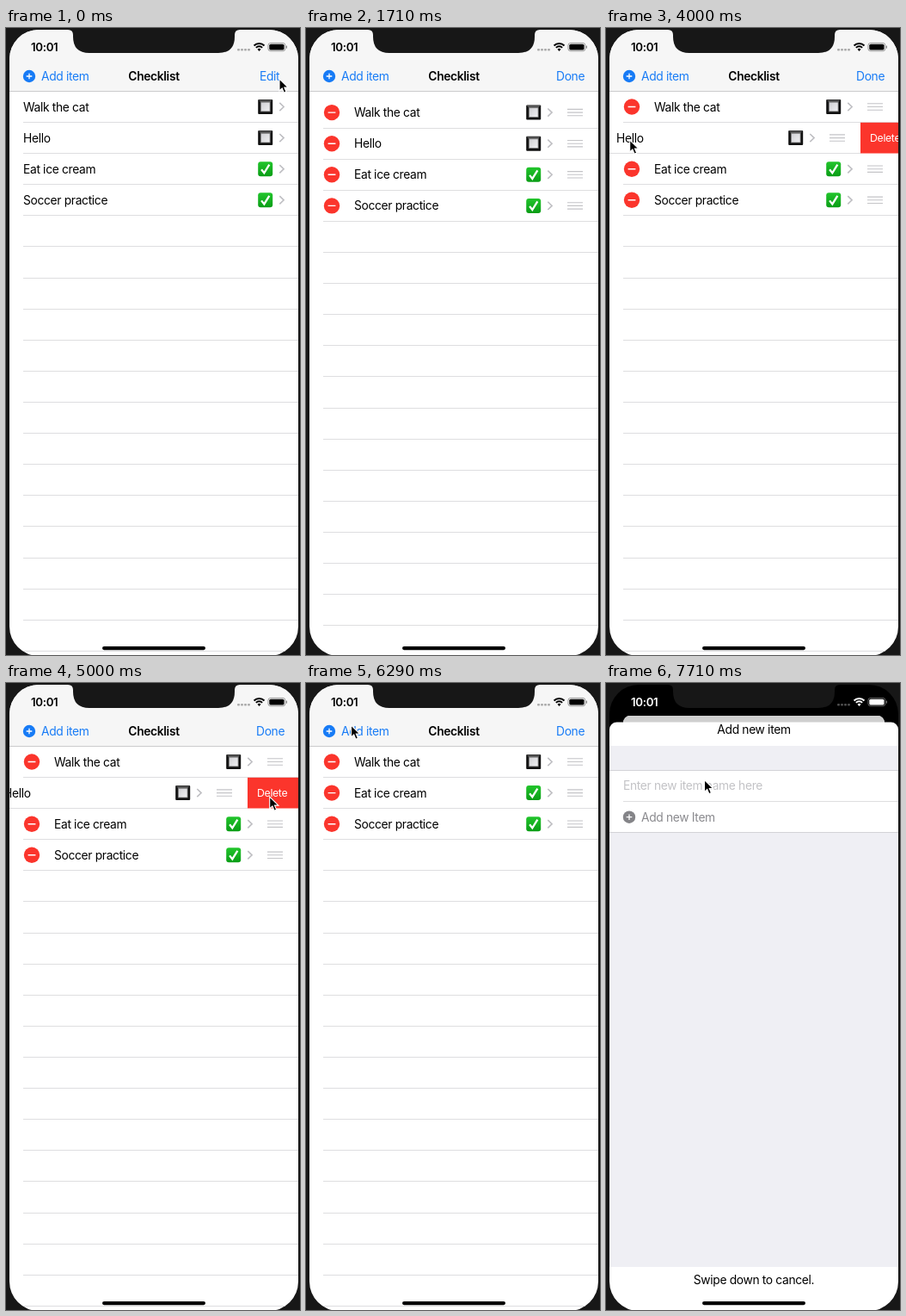
Animation, 342 px wide and 728 px high, one loop 8 s. Source, as an HTML page:

```html
<!DOCTYPE html>
<html lang="en">
<head>
<meta charset="utf-8">
<title>Checklist</title>
<style>
  html, body { margin: 0; width: 100%; height: 100%; overflow: hidden; background: #171717; }
  #stage { display: block; width: 342px; height: 728px; }
  text { font: 13.8px Inter, sans-serif; letter-spacing: -.33px; white-space: pre; }
  .bold { font-weight: 600; }
  .mid { text-anchor: middle; }
</style>
</head>
<body>
<svg id="stage" viewBox="0 0 342 728">
  <defs>
    <clipPath id="screen"><rect x="4" y="2" width="336" height="727" rx="34"/></clipPath>
    <linearGradient id="green" x2="0" y2="1">
      <stop stop-color="#22c52c"/><stop offset="1" stop-color="#0a9d16"/>
    </linearGradient>
    <linearGradient id="pale" x2="1" y2="1">
      <stop stop-color="#cfcfd3"/><stop offset="1" stop-color="#f1f1f3"/>
    </linearGradient>
    <g id="box">
      <rect x="-8.5" y="-8.5" width="17" height="17" rx="1" fill="#111"/>
      <path d="M-8-8H8L5-5H-5Z" fill="#555"/>
      <rect x="-5.4" y="-5.4" width="10.8" height="10.8" fill="url(#pale)" stroke="#777" stroke-width=".8"/>
    </g>
    <g id="tick">
      <rect x="-8.5" y="-8.5" width="17" height="17" rx="3" fill="url(#green)"/>
      <path d="M-4.6 .6L-1.4 4.6L4.6-5" fill="none" stroke="#fff" stroke-width="2.3"/>
    </g>
    <g id="plus">
      <circle r="7.2"/>
      <path d="M-3.3 0H3.3M0-3.3V3.3" stroke="#fff" stroke-width="1.3"/>
    </g>
  </defs>
  <g id="scene"></g>
</svg>
<script>
const LOOP = 8000, FPS = 7, LAST = 54;
const TOP = 73.5, ROW = 36.1, BLUE = '#177bf6', RED = '#fb352c';
const items = [['Walk the cat', 'box'], ['Hello', 'box'], ['Eat ice cream', 'tick'], ['Soccer practice', 'tick']];

// Piecewise linear value from [time, value] pairs
function track(t, keys) {
  let i = 0;
  while (i < keys.length - 1 && t >= keys[i + 1][0]) i++;
  const [t0, a] = keys[i], [t1, b] = keys[i + 1] || [t0 + 1, a];
  return a + (b - a) * Math.max(0, (t - t0) / (t1 - t0));
}
const progress = (t, from, to) => Math.min(1, Math.max(0, (t - from) / (to - from)));
const smooth = p => p * p * (3 - 2 * p);
const easeOut = p => 1 - (1 - p) ** 3;

const rect = (x, y, w, h, fill, more = '') =>
  `<rect x="${x}" y="${y}" width="${w}" height="${h}" fill="${fill}" ${more}/>`;
const text = (x, y, s, fill = '#000', cls = '', more = '') =>
  `<text x="${x}" y="${y}" fill="${fill}" class="${cls}" ${more}>${s}</text>`;
const at = (x, y, s, more = '') => `<g transform="translate(${x} ${y})" ${more}>${s}</g>`;
const icon = (id, x, y, fill = '') => `<use href="#${id}" x="${x}" y="${y}" fill="${fill}"/>`;
const hline = (x, y, color = '#dedee0') => rect(x, Math.round(y), 340 - x, 1, color);

function row([label, mark], edit, shift) {
  const away = 1 - edit, minus = '<path d="M-4.4 0H4.4" stroke="#fff" stroke-width="1.4"/>';
  return at(-4 - shift, 18,
    at(30 - 46 * away, 0, `<circle r="9.2" fill="${RED}"/>${minus}`) +
    text(20 + 36 * edit, 5, label) +
    icon(mark, 301.7 - 37 * edit, 0) +
    at(320.7 - 37 * edit, 0, '<path d="M-2.4-4.6L2.4 0L-2.4 4.6" fill="none" stroke="#bfbfc3" stroke-width="1.6"/>') +
    at(313 + 40 * away, 0, '<path d="M-9-3.7H9M-9 0H9M-9 3.7H9" stroke="#c4c4c7" stroke-width="1.1"/>', `opacity="${edit}"`)) +
    (shift ? rect(336 - shift, 0, shift, ROW, RED) +
      text(347 - shift, 22.5, 'Delete', '#fff', '', 'style="font-size:12.3px"') : '');
}

function list(t) {
  const edit = smooth(progress(t, 420, 860));
  const pull = track(t, [[1290, 0], [1570, 5], [1714, 6.6], [1857, 4], [2000, 1.5], [2143, 0]]);
  const gone = smooth(progress(t, 5143, 5428));
  const slide = track(t, [[3857, 0], [4000, 44], [4143, 56], [4286, 59]]) + 277 * gone;
  let out = rect(4, 2, 336, 727, '#fff'), y = TOP + pull;
  for (let i = 0; i < 20; i++) {
    const h = i == 1 ? ROW * (1 - gone) : ROW, shift = i == 1 ? slide : 0;
    if (h && items[i])
      out += `<svg x="4" y="${y}" width="336" height="${h}">${row(items[i], edit, shift)}</svg>`;
    y += h;
    if (h) out += shift ? rect(4, Math.round(y - .5), 336 - shift, 1, '#dedee0') : hline(20, y - .5);
  }
  const pressed = t > 140 && t < 420 ? .35 : 1;
  const tapped = t > 6400 && t < 6600 ? .35 : 1;
  return out + rect(4, 2, 336, 71, '#f6f6f6') + hline(4, 73, '#cbcbcd') +
    `<g opacity="${tapped}">${icon('plus', 27, 56, BLUE) + text(41, 60.6, 'Add item', BLUE)}</g>` +
    text(172, 60.6, 'Checklist', '#000', 'bold mid') +
    text(295, 60.6, 'Edit', BLUE, '', `opacity="${(1 - edit) * pressed}"`) +
    text(291, 60.6, 'Done', BLUE, '', `opacity="${edit}"`);
}

function sheet(p) {
  return at(0, 683 * (1 - p),
    rect(4, 45.5, 336, 700, '#fff', 'rx="8.5"') +
    rect(4, 73, 336, 605, '#efeff4') +
    rect(4, 101, 336, 72, '#fff') +
    hline(4, 101, '#d3d3d7') + hline(20, 136.5) + hline(4, 173, '#d3d3d7') +
    text(172, 59, 'Add new item', '#000', 'mid') +
    text(20, 123.5, 'Enter new item name here', '#c3c3c6') +
    icon('plus', 27, 155.7, '#848488') + text(41, 160.5, 'Add new Item', '#8a8a8e') +
    text(172, 697.8, 'Swipe down to cancel.', '#000', 'mid'));
}

function statusBar(color) {
  const dots = [269, 273, 277, 281].map(x => rect(x, 24, 3, 2.6, color, 'rx="1" opacity=".3"')).join('');
  const arc = r => `M${-r * .72} ${-r * .72}A${r} ${r} 0 0 1 ${r * .72} ${-r * .72}`;
  return text(29, 26.8, '10:01', color, 'bold', 'style="font-size:13.3px"') + dots +
    at(294.5, 26.5, `<path d="${arc(8.3)}${arc(5)}" fill="none" stroke="${color}" stroke-width="2"/>` +
      `<path d="M0 .4L-2-1.8A2.8 2.8 0 0 1 2-1.8Z" fill="${color}"/>`) +
    rect(304.9, 17.4, 20, 9.4, 'none', `rx="2.8" stroke="${color}" stroke-width=".9" opacity=".4"`) +
    rect(306.3, 18.7, 17.2, 6.8, color, 'rx="1.6"') +
    rect(325.8, 20.5, 1.2, 3.2, color, 'rx=".6" opacity=".45"');
}

function cursor(t) {
  if (t > 1500 && t < 1900) return '';
  const path = [[0, 318, 59], [1290, 318, 59], [2143, 22.7, 142], [2290, 22.7, 142], [2710, 27.7, 130],
    [4290, 27.7, 130], [4857, 306, 131], [5000, 306.7, 132], [5430, 306.7, 132], [5710, 54, 52],
    [6000, 54, 52], [6280, 52.5, 49], [7140, 52.5, 49], [7710, 114.5, 112.5]];
  const x = track(t, path.map(k => [k[0], k[1]])), y = track(t, path.map(k => [k[0], k[2]]));
  return at(x, y, '<path d="M0 0V14L3.2 11L5.4 16.2L7.9 15.1L5.8 10.1H10.2Z" stroke="#fff" stroke-width="1.1"/>');
}

function scene(t) {
  const p = easeOut(progress(t, 6571, 7200)), s = 1 - .095 * p;
  const card = `<svg x="4" y="2" width="336" height="727"><g transform="translate(${168 * (1 - s)} ${36 * p}) scale(${s})">` +
    `<g transform="translate(-4 -2)" clip-path="url(#card)">${list(t) + rect(4, 2, 336, 727, '#000', `opacity="${.16 * p}"`)}</g></g></svg>`;
  return `<clipPath id="card">${rect(4, 2, 336, 727, '#000', `rx="${9 * Math.min(1, p * 3)}"`)}</clipPath>` +
    rect(0, 0, 342, 728, '#171717') +
    `<g clip-path="url(#screen)">${rect(4, 2, 336, 727, '#000') + card + (p ? sheet(p) : '') +
      statusBar(p > .3 ? '#fff' : '#000') + rect(112, 718, 120, 4.2, '#000', 'rx="2.1"')}</g>` +
    '<path d="M72 0V2Q78 2 78 8V10Q78 29 97 29H247Q266 29 266 10V8Q266 2 272 2V0Z" fill="#171717"/>' +
    cursor(t);
}

const root = document.getElementById('scene');
const start = performance.now();
let shown = -1;
function tick() {
  const t = (performance.now() - start) % LOOP;
  const step = Math.min(LAST, Math.floor(t * FPS / 1000 + .05));
  if (step !== shown) root.innerHTML = scene((shown = step) * 1000 / FPS);
  requestAnimationFrame(tick);
}
tick();
</script>
</body>
</html>
```
